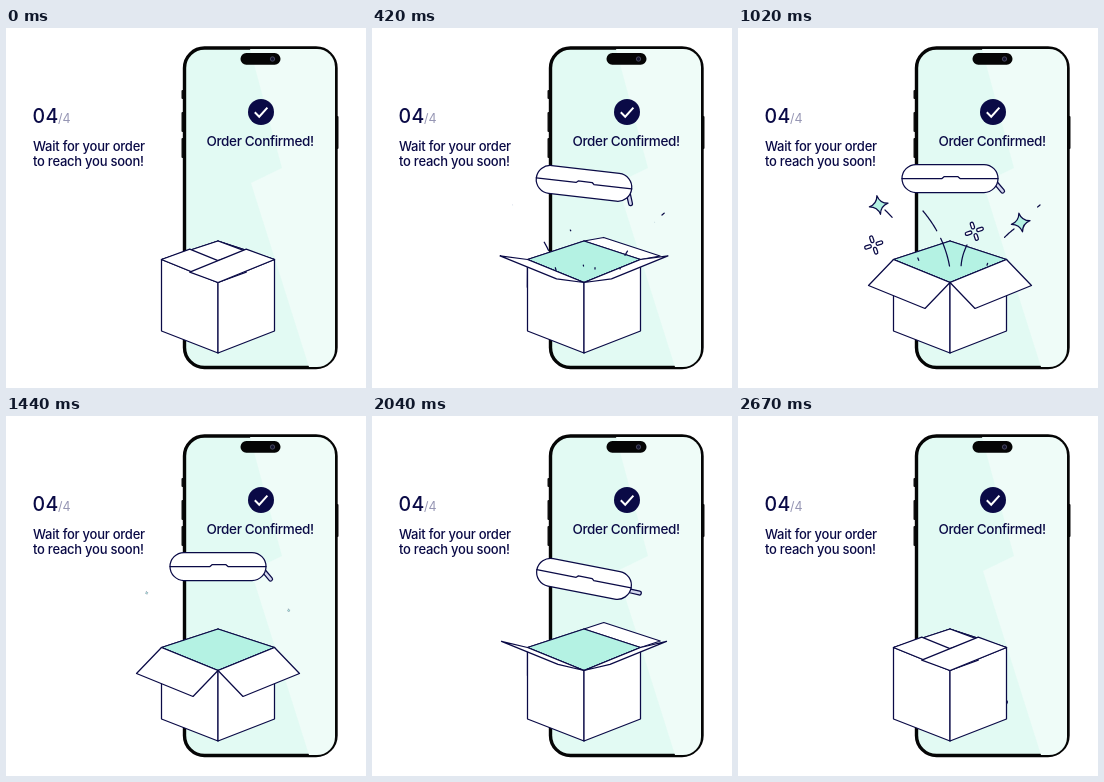
Animation, 360 px wide and 360 px high, one loop 2700 ms. Source, as an HTML page with a canvas:

```html
<!DOCTYPE html>
<html lang="en">
<head>
<meta charset="utf-8">
<title>Order confirmed</title>
<style>
  html, body { margin: 0; width: 100%; height: 100%; overflow: hidden; background: #fff; }
  svg, canvas { position: absolute; left: 0; top: 0; width: 360px; height: 360px; }
  text { font-family: Inter, "Open Sans", sans-serif; font-weight: 500; fill: #0a0a46; }
  .count { font-size: 19.5px; letter-spacing: .5px; }
  .total { font-size: 12.5px; font-weight: 400; fill: #9696b4; }
  .note { font-size: 13px; letter-spacing: -.25px; }
  .title { font-size: 13.5px; letter-spacing: -.35px; }
</style>
</head>
<body>
<svg viewBox="0 0 360 360">
  <defs><clipPath id="screen"><rect x="179" y="21" width="150" height="318" rx="18"/></clipPath></defs>
  <g fill="#111">
    <rect x="175.5" y="62" width="3" height="9" rx="1"/>
    <rect x="175.5" y="84" width="3" height="20" rx="1"/>
    <rect x="175.5" y="110" width="3" height="20" rx="1"/>
    <rect x="329.5" y="88" width="3" height="33" rx="1"/>
  </g>
  <rect x="178.5" y="20" width="151.5" height="319.5" rx="20" fill="#e2faf3" stroke="#050505" stroke-width="3.4"/>
  <path clip-path="url(#screen)" d="M244 21H329V339H303L245 155L276 140Z" fill="#effcf8"/>
  <rect x="234.5" y="25" width="40" height="11.7" rx="5.8" fill="#050505"/>
  <circle cx="266.5" cy="31" r="2.2" fill="#15152f" stroke="#55556a" stroke-width=".8"/>
  <circle cx="255" cy="84" r="13" fill="#0a0a46"/>
  <path d="M248.8 84.3L253.2 88.7L261.4 79.6" fill="none" stroke="#fff" stroke-width="2"/>
  <text class="title" x="200.5" y="117.7">Order Confirmed!</text>
  <text class="count" x="26.5" y="95">04</text>
  <text class="total" x="52" y="95">/4</text>
  <text class="note" x="27" y="123">Wait for your order</text>
  <text class="note" x="27" y="138">to reach you soon!</text>
</svg>
<canvas id="stage"></canvas>
<script>
const LOOP = 2700, NAVY = '#0a0a46', MINT = '#b4f2e3';
const canvas = document.getElementById('stage');
const ctx = canvas.getContext('2d');
const ratio = Math.max(1, window.devicePixelRatio || 1);
canvas.width = canvas.height = 360 * ratio;

const left = [155.5, 231.5], back = [212, 213], right = [268.5, 231.5], front = [212, 254.5];
const centre = [212, 232.7];
const bottomLeft = [155.5, 303], bottomFront = [212, 325], bottomRight = [268.5, 303];

// turn: fully open angle; depth: how much perspective shortens the flap as it swings out
const backLeft = { hinge: [left, back], turn: 270, depth: .15 };
const backRight = { hinge: [back, right], turn: 270, depth: .15 };
const frontLeft = { hinge: [left, front], turn: 217, depth: -.06 };
const frontRight = { hinge: [front, right], turn: 217, depth: -.06 };

const trails = [
  { path: [[184, 242], [174, 208], [147, 182]], dashes: [[0, .18], [.3, 1]], wait: 0 },
  { path: [[211.5, 238], [206, 208], [185, 183]], dashes: [[0, .48], [.62, 1]], wait: 250 },
  { path: [[223, 241], [223, 229], [229, 217]], dashes: [[0, 1]], wait: 200 },
  { path: [[248, 241], [253, 219], [276, 201]], dashes: [[0, .13], [.32, 1]], wait: 40 },
  { path: [[290, 187], [296, 182], [302, 177]], dashes: [[0, 1]], wait: 0 }
];

const mix = (a, b, u) => a + (b - a) * u;
const ramp = (t, from, to) => Math.min(1, Math.max(0, (t - from) / (to - from)));
const ease = (t, from, to) => {
  const u = ramp(t, from, to);
  return u * u * (3 - 2 * u);
};
const pulse = (t, start, full, fade, end) => ease(t, start, full) - ease(t, fade, end);

function trace(points) {
  ctx.beginPath();
  points.forEach(p => ctx.lineTo(...p));
}

function paint(fill) {
  ctx.fillStyle = fill;
  ctx.fill();
  ctx.stroke();
}

function polygon(points, fill) {
  trace(points);
  ctx.closePath();
  paint(fill);
}

function pill(x, y, width, height, fill) {
  ctx.beginPath();
  ctx.roundRect(x, y, width, height, height / 2);
  paint(fill);
}

function placed(x, y, degrees, scale, drawPart) {
  ctx.save();
  ctx.translate(x, y);
  ctx.rotate(degrees * Math.PI / 180);
  ctx.scale(scale, scale);
  drawPart();
  ctx.restore();
}

// A flap swings round its hinge from the closed lid, through upright, to the outside.
function drawFlap({ hinge: [a, b], turn, depth }, open) {
  const angle = turn * open * Math.PI / 180, cos = Math.cos(angle);
  const reach = cos * (1 - depth + depth * cos);
  const dx = reach * (centre[0] - (a[0] + b[0]) / 2);
  const dy = reach * (centre[1] - (a[1] + b[1]) / 2) - 28 * Math.sin(angle);
  polygon([a, b, [b[0] + dx, b[1] + dy], [a[0] + dx, a[1] + dy]], '#fff');
}

function drawCase(t) {
  const lift = pulse(t, 100, 465, 1970, 2330);
  const rise = 1 - ease(t, 300, 560), fall = ease(t, 1750, 2050);
  const tilt = 12 * rise + 11 * fall;
  placed(212, mix(272, 150.5, lift), tilt, 1, () => {
    placed(44.5, 3, 50 + 50 * rise - 37 * fall - tilt, 1, () => pill(0, -1.9, 14.5, 3.8, '#d5d8ef'));
    pill(-48, -14, 96, 28, '#fff');
    trace([[-48, 0], [-8, 0], [-6, -1.8], [8, -1.8], [10, 0], [48, 0]]);
    ctx.stroke();
  });
}

// Each dash grows from its near end, then shrinks towards its far end.
function drawTrail({ path: [a, b, c], dashes, wait }, t) {
  const head = ramp(t, 380 + wait / 8, 600 + wait / 2), tail = ramp(t, 780 + wait, 1080 + wait);
  if (head === 0 || tail === 1) return;
  const point = u => [0, 1].map(n => mix(mix(a[n], b[n], u), mix(b[n], c[n], u), u));
  for (const [from, to] of dashes) {
    const start = mix(from, to, tail), end = mix(from, to, head);
    trace(Array.from({ length: 13 }, (_, i) => point(mix(start, end, i / 12))));
    ctx.stroke();
  }
}

function drawStar(x, y, t) {
  const size = pulse(t, 390, 650, 1140, 1540);
  if (size < .01) return;
  placed(x, y, -11, size, () => {
    ctx.beginPath();
    ctx.moveTo(0, -9.5);
    for (const [px, py] of [[9.5, 0], [0, 9.5], [-9.5, 0], [0, -9.5]]) {
      ctx.quadraticCurveTo((px + py) * .16, (py - px) * .16, px, py);
    }
    ctx.closePath();
    paint(MINT);
  });
}

function drawCross(x, y, t) {
  const size = pulse(t, 420, 660, 1080, 1410);
  if (size < .01) return;
  for (let i = 0; i < 4; i++) {
    placed(x, y, 45 + i * 90 + (t - 780) * .11, size, () => pill(2.6, -1.6, 6.8, 3.2, '#fff'));
  }
}

function draw(t) {
  ctx.setTransform(ratio, 0, 0, ratio, 0, 0);
  ctx.clearRect(0, 0, 360, 360);
  ctx.strokeStyle = NAVY;
  ctx.lineWidth = 1.25;
  ctx.lineJoin = ctx.lineCap = 'round';

  const open = pulse(t, 60, 630, 1800, 2430);
  const openFirst = pulse(t, 60, 430, 2060, 2430);
  const backFlaps = [[backRight, open], [backLeft, openFirst]];
  const isOutside = ([flap, amount]) => flap.turn * amount > 90;

  backFlaps.filter(isOutside).forEach(args => drawFlap(...args));
  polygon([left, back, right, front], MINT);
  backFlaps.filter(args => !isOutside(args)).forEach(args => drawFlap(...args));
  drawCase(t);
  polygon([left, front, bottomFront, bottomLeft], '#fff');
  polygon([front, right, bottomRight, bottomFront], '#fff');
  drawFlap(frontLeft, open);
  drawFlap(frontRight, open);

  trails.forEach(trail => drawTrail(trail, t));
  drawStar(140.7, 177, t);
  drawStar(282.7, 194.5, t);
  drawCross(135.7, 217, t);
  drawCross(236.3, 203.3, t);
}

const began = performance.now();
function tick() {
  draw((performance.now() - began) % LOOP);
  requestAnimationFrame(tick);
}
tick();
</script>
</body>
</html>
```
